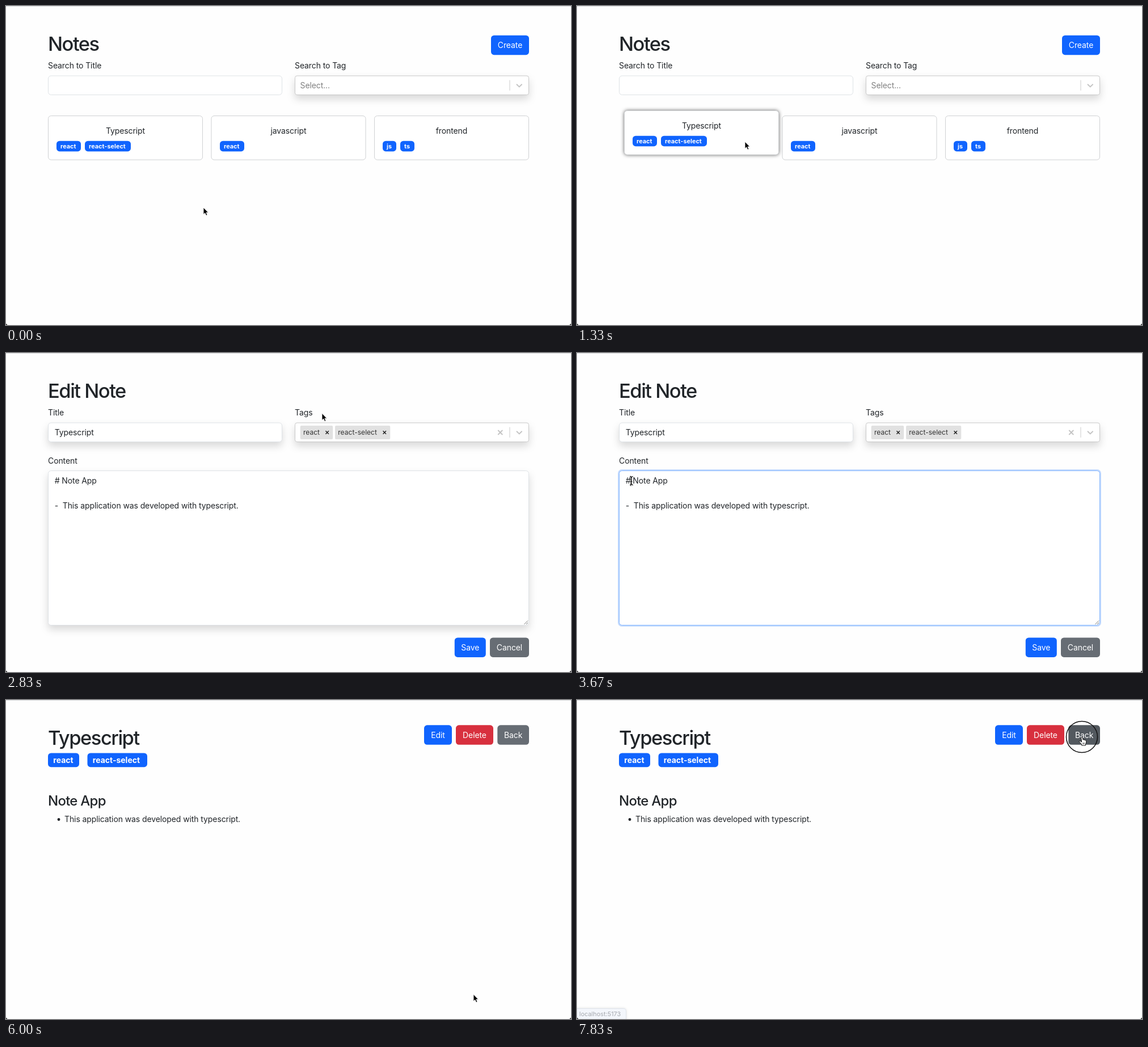
Recreate the animation shown at these times as an HTML page. Size 996 by 562 pixels, loop 8000 ms.

```html
<!DOCTYPE html>
<html lang="en">
<head>
<meta charset="utf-8">
<title>Notes</title>
<style>
  html, body { margin: 0; width: 100%; height: 100%; overflow: hidden; background: #fefefe; }
  svg { display: block; width: 100%; height: 100%; }
  text { font: 14px Inter, "Open Sans", sans-serif; letter-spacing: -.1px; fill: #212529; white-space: pre; font-optical-sizing: none; }
  .h1 { font-size: 34.5px; font-weight: 500; letter-spacing: -1.5px; }
  .h3 { font-size: 24px; font-weight: 500; letter-spacing: -.75px; }
  .mid { text-anchor: middle; }
  .light { fill: #fff; }
  .hint { fill: #808080; }
  .badge { font-size: 10.9px; font-weight: 700; letter-spacing: 0; fill: #fff; }
  .tag { font-size: 14px; font-weight: 700; letter-spacing: 0; fill: #fff; }
  .chip { font-size: 12.1px; letter-spacing: 0; fill: #333; }
  .status { font-size: 10.9px; letter-spacing: 0; fill: #a6a9af; }
  .shadow { filter: drop-shadow(0 7px 7px rgba(0, 0, 0, .15)); }
</style>
</head>
<body>
<svg id="stage" viewBox="0 0 996 562"></svg>
<script>
const stage = document.getElementById('stage');
const LOOP = 8000, FPS = 6;
const BLUE = ['#1064fe', '#1156d2'], RED = ['#d8303e', '#b92b38'], GRAY = ['#676d74', '#53595f'];

// Pointer path: time, x, y
const PATH = [
  [0, 348, 355], [1300, 296, 239], [1660, 296, 239], [2200, 764, 58], [2600, 764, 58],
  [3250, 60, 222], [3490, 96, 225], [5100, 96, 225], [5650, 824, 518.5], [6600, 824, 518.5],
  [7500, 890, 65], [LOOP, 890, 65]
];
const CLICKS = [9, 14, 21, 35, 47];

let pointer = { x: 0, y: 0 };

const clamp = v => Math.max(0, Math.min(1, v));
const smooth = v => v * v * (3 - 2 * v);

function pointerAt(t) {
  const i = PATH.findIndex(p => p[0] > t);
  const [t0, x0, y0] = PATH[i - 1], [t1, x1, y1] = PATH[i];
  const k = smooth((t - t0) / (t1 - t0));
  return { x: x0 + (x1 - x0) * k, y: y0 + (y1 - y0) * k };
}

const over = (x, y, w, h) =>
  pointer.x >= x && pointer.x <= x + w && pointer.y >= y && pointer.y <= y + h;

const text = (x, y, label, cls = '') => `<text x="${x}" y="${y}" class="${cls}">${label}</text>`;

const rect = (x, y, w, h, r, fill, extra = '') =>
  `<rect x="${x}" y="${y}" width="${w}" height="${h}" rx="${r}" fill="${fill}" ${extra}/>`;

const line = (d, color, width) =>
  `<path d="${d}" fill="none" stroke="${color}" stroke-width="${width}"/>`;

const field = (x, y, w, h, border, extra = '', r = 5) =>
  rect(x + .5, y + .5, w - 1, h - 1, r, '#fff', `stroke="${border}" ${extra}`);

const cross = (x, y, r, color, width) =>
  line(`M${x - r} ${y - r}l${2 * r} ${2 * r}m0 ${-2 * r}l${-2 * r} ${2 * r}`, color, width);

const button = (x, y, w, label, [color, hover]) =>
  rect(x, y, w, 34.5, 5.4, over(x, y, w, 34.5) ? hover : color) +
  text(x + w / 2, y + 22.5, label, 'mid light');

const badge = (x, y, w, label) =>
  rect(x, y, w, 18.5, 5.4, BLUE[0]) + text(x + 7, y + 13.3, label, 'badge');

const tag = (x, w, label) =>
  rect(x, 93.5, w, 24.7, 5.4, BLUE[0]) + text(x + 9.3, 111.4, label, 'tag');

const chip = (x, w, label) =>
  rect(x, 128, w, 24, 2, '#e1e1e1') + text(x + 5.2, 144.2, label, 'chip') +
  cross(x + w - 10, 140, 2.7, '#222', 1.5);

const selectBox = () =>
  field(509, 122.5, 413, 34.5, '#c8c8c8', 'class="shadow"', 3.6) +
  line('M888 130.5v18.5', '#ccc', 1) +
  line('M900 137.8l4.8 4.6l4.8 -4.6', '#c4c4c4', 1.9);

function card(x, title, badges, lift = 0) {
  const glow = lift ? `style="filter:drop-shadow(0 0 3px rgba(0,0,0,${.6 * lift}))"` : '';
  return `<g transform="translate(${9 * lift} ${-9 * lift})">` +
    field(x, 193, 273, 78.5, '#cfd1d3', glow) +
    text(x + 136.5, 224.7, title, 'mid') +
    badges.map(([dx, w, label]) => badge(x + dx, 237.7, w, label)).join('') + '</g>';
}

function listPage(t) {
  const lift = smooth(clamp((t - 800) / 300));
  return text(74, 79, 'Notes', 'h1') + button(855, 51.7, 67, 'Create', BLUE) +
    text(74, 109.7, 'Search to Title') + text(509, 109.7, 'Search to Tag') +
    field(74, 122.5, 413, 34.5, '#dee2e6') +
    selectBox() + text(518.5, 145, 'Select...', 'hint') +
    card(361.5, 'javascript', [[15.5, 43, 'react']]) +
    card(649, 'frontend', [[15, 24, 'js'], [46, 25, 'ts']]) +
    card(74, 'Typescript', [[15, 43, 'react'], [65, 81, 'react-select']], lift);
}

function detailPage(small) {
  const y = small ? 214.7 : 227;
  return text(74, 79, 'Typescript', 'h1') +
    tag(74, 55, 'react') + tag(143.5, 105.5, 'react-select') +
    button(737, 44.3, 49, 'Edit', BLUE) + button(793, 44.3, 66, 'Delete', RED) +
    button(866.3, 44.3, 55.7, 'Back', GRAY) +
    (small ? text(74, 186, 'Note App', 'h3') : text(74, 196, 'Note App', 'h1')) +
    `<circle cx="93" cy="${y - 4.2}" r="2.4" fill="#212529"/>` +
    text(103, y, 'This application was developed with typescript.');
}

function contentArea(t) {
  const focus = clamp((t - 3500) / 300);
  const hashes = 1 + (t > 4600) + (t > 4800);
  const sinceKey = t - (hashes > 1 ? 4830 : 3500);
  const caretOn = focus > 0 && (sinceKey < 0 || sinceKey % 1000 < 500);
  const ring = 3.6 * focus;
  return (focus ? rect(74 - ring, 207 - ring, 848 + 2 * ring, 273 + 2 * ring, 5 + ring, '#c3dafe') : '') +
    field(74, 207, 848, 273, focus ? '#86b7fe' : '#dee2e6', focus ? '' : 'class="shadow"') +
    text(85.7, 230.3, '#'.repeat(hashes) + ' Note App') +
    text(85.7, 273.7, '-  This application was developed with typescript.') +
    line('M913.5 478l6.5 -6.5M917 478l3 -3', '#777', 1) +
    (caretOn ? line(`M${86 + 8.9 * hashes} 216.5v18`, '#111', 1) : '');
}

function editPage(t) {
  return text(74, 79, 'Edit Note', 'h1') +
    text(74, 109.7, 'Title') + text(509, 109.7, 'Tags') + text(74, 195, 'Content') +
    field(74, 122.5, 413, 34.5, '#dee2e6', 'class="shadow"') + text(85.7, 145, 'Typescript') +
    selectBox() + chip(518.7, 57.5, 'react') + chip(580, 97.3, 'react-select') +
    cross(871.3, 140, 4, '#c4c4c4', 1.9) + contentArea(t) +
    button(790.8, 501.4, 55, 'Save', BLUE) + button(853, 501.4, 69, 'Cancel', GRAY);
}

const ARROW = '<path d="M0 0V12.3L2.8 9.7L4.8 14.2L7 13.2L5 8.9H8.7Z" fill="#000" stroke="#fff" stroke-width=".9"/>';
const BEAM = line('M-3 -7.5Q0 -7.5 0 -5Q0 -7.5 3 -7.5M0 -5V5M-3 7.5Q0 7.5 0 5Q0 7.5 3 7.5M-1.5 1.5h3', '#111', 1.2);
const HAND = '<path d="M-1.3 1.2Q0 -.6 1.4 1.2L2 5Q3.2 4.2 4 5.3Q5.3 4.7 6 6Q7.6 5.6 7.8 7.3Q8 10.5 6.5 12.5V15H-.3V13Q-2.5 11 -5 8.2Q-4.4 6.3 -2.4 7.6L-.4 9Z" fill="#fff" stroke="#111" stroke-width="1"/>' +
  line('M2 10v3M4 10v3', '#111', .8);

function cursor(page) {
  let shape = ARROW;
  if (page === 'edit') {
    if (over(74, 207, 848, 273) || over(74, 122, 413, 35)) shape = BEAM;
    if (over(791, 501, 55, 35)) shape = HAND;
  } else if (page === 'detail' && (over(737, 44, 122, 35) || over(866, 44, 56, 35))) shape = HAND;
  return `<g transform="translate(${pointer.x} ${pointer.y})">${shape}</g>`;
}

const statusBar = () =>
  '<path d="M-1 543.5H82Q86.5 543.5 86.5 548V563H-1Z" fill="#f3f6fb" stroke="#dfe3ea" style="filter:drop-shadow(0 0 2px rgba(0,0,0,.1))"/>' +
  text(4, 557.3, 'localhost:5173', 'status');

const windowFrame = () =>
  rect(0, 0, 996, 1, 0, '#d8d9dc') +
  '<path d="M0 559Q.4 561.6 3 562H0ZM996 559Q995.6 561.6 993 562H996Z" fill="#000"/>';

function render(step) {
  const t = step * 1000 / FPS;
  pointer = pointerAt(t);
  const page = step < 10 ? 'list' : step < 15 || step > 35 ? 'detail' : 'edit';
  const typing = t > 4600 && t < 5100;
  stage.innerHTML = rect(0, 0, 996, 562, 0, '#fefefe') +
    (page === 'list' ? listPage(t) : page === 'edit' ? editPage(t) : detailPage(step > 35)) +
    (step === 47 ? statusBar() : '') + windowFrame() +
    (typing ? '' : cursor(page)) +
    (CLICKS.includes(step)
      ? `<circle cx="${pointer.x}" cy="${pointer.y}" r="27.5" fill="none" stroke="#111" stroke-width="1.5"/>` : '');
}

const start = performance.now();
let shown = -1;
function tick() {
  const elapsed = (performance.now() - start) % LOOP;
  const step = Math.floor((elapsed + 4) * FPS / 1000) % (LOOP * FPS / 1000);
  if (step !== shown) render(shown = step);
  requestAnimationFrame(tick);
}
tick();
</script>
</body>
</html>
```
